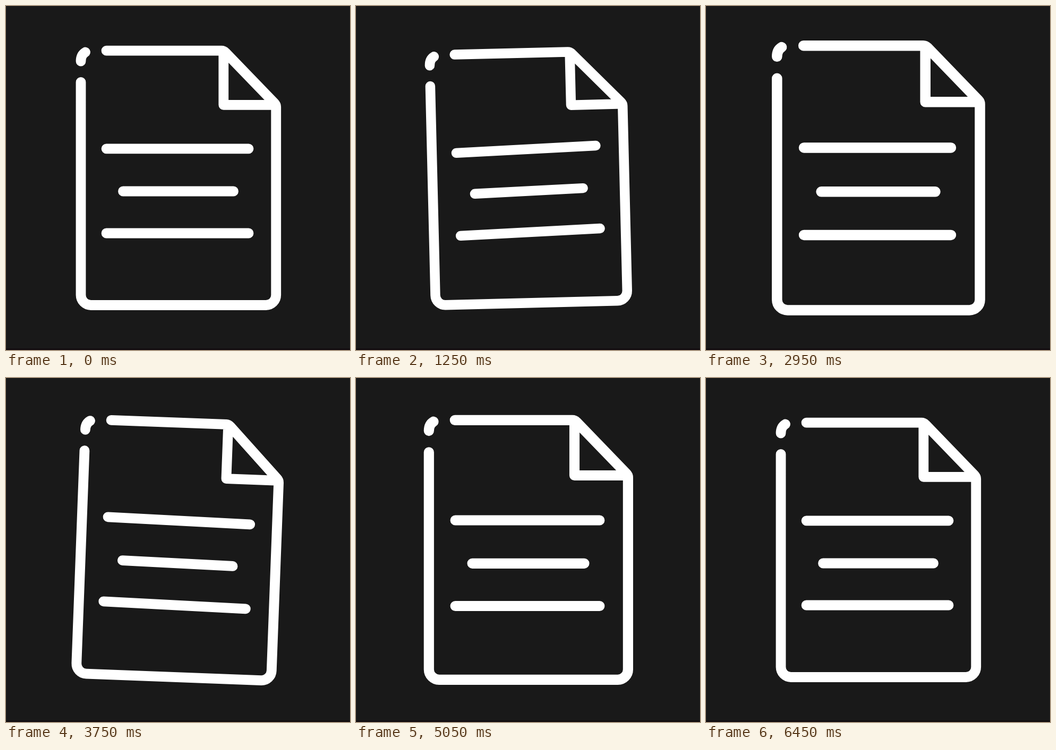
These frames come from a looping animation (648 px wide and 648 px high, 7.55 s). An HTML page with a canvas:

```html
<!DOCTYPE html>
<html lang="en">
<head>
<meta charset="utf-8">
<title>Document icon</title>
<style>
  html, body { margin: 0; width: 100%; height: 100%; overflow: hidden; background: #191919; }
  canvas { display: block; width: 648px; height: 648px; }
</style>
</head>
<body>
<canvas id="stage" width="648" height="648"></canvas>
<script>
const ctx = document.getElementById('stage').getContext('2d');
const SIZE = 648, MID = SIZE / 2;
const LOOP = 7550, CYCLE = 2282, STEP = 50;
const LAG = 34; // the text lines trail the page

// Keys: [time, value, bend]; bend > 1 delays the start of the segment ending there.
const SCALE = [[160, 1], [720, 1.041, 1.3], [1140, 0.975], [1430, 1]];
const ANGLE = [[850, 0], [1140, -3.05], [1430, 2.2], [1850, 0]];

function valueAt(keys, t) {
  if (t <= keys[0][0]) return keys[0][1];
  for (let i = 1; i < keys.length; i++) {
    const [t0, v0] = keys[i - 1];
    const [t1, v1, bend = 1] = keys[i];
    if (t < t1) {
      const p = Math.pow((t - t0) / (t1 - t0), bend);
      return v0 + (v1 - v0) * (1 - Math.cos(Math.PI * p)) / 2;
    }
  }
  return keys[keys.length - 1][1];
}

const outline = new Path2D(
  'M141 143.5V544.5A19 19 0 0 0 160 563.5H489.7A19 19 0 0 0 508.7 544.5' +
  'V190Q508.7 186 505.5 182.7L413.5 87.5Q410 84.2 406 84.2H189' +
  'M409.8 85V186.3H508' +
  'M141 104Q141 92 149.5 87'
);
const textLines = new Path2D('M189 268.8H457M220.5 349H428.5M189 428H457');

function strokePath(path, scale, degrees) {
  ctx.save();
  ctx.translate(MID, MID);
  ctx.rotate(degrees * Math.PI / 180);
  ctx.scale(scale, scale);
  ctx.translate(-MID, -MID);
  ctx.stroke(path);
  ctx.restore();
}

function draw(time) {
  const t = Math.floor((time % LOOP) / STEP) * STEP;
  const phase = t - Math.min(2, Math.floor(t / CYCLE)) * CYCLE;
  const late = phase - LAG;

  ctx.fillStyle = '#191919';
  ctx.fillRect(0, 0, SIZE, SIZE);
  ctx.fillStyle = '#130d10';
  ctx.fillRect(0, SIZE - 3, SIZE, 3);

  ctx.strokeStyle = '#fff';
  ctx.lineWidth = 18.8;
  ctx.lineCap = ctx.lineJoin = 'round';
  strokePath(outline, valueAt(SCALE, phase), valueAt(ANGLE, phase));
  strokePath(textLines, 1 + (valueAt(SCALE, late) - 1) * 0.9, valueAt(ANGLE, late) * 1.36);
}

const start = performance.now();
function frame() {
  draw(performance.now() - start);
  requestAnimationFrame(frame);
}
frame();
</script>
</body>
</html>
```
